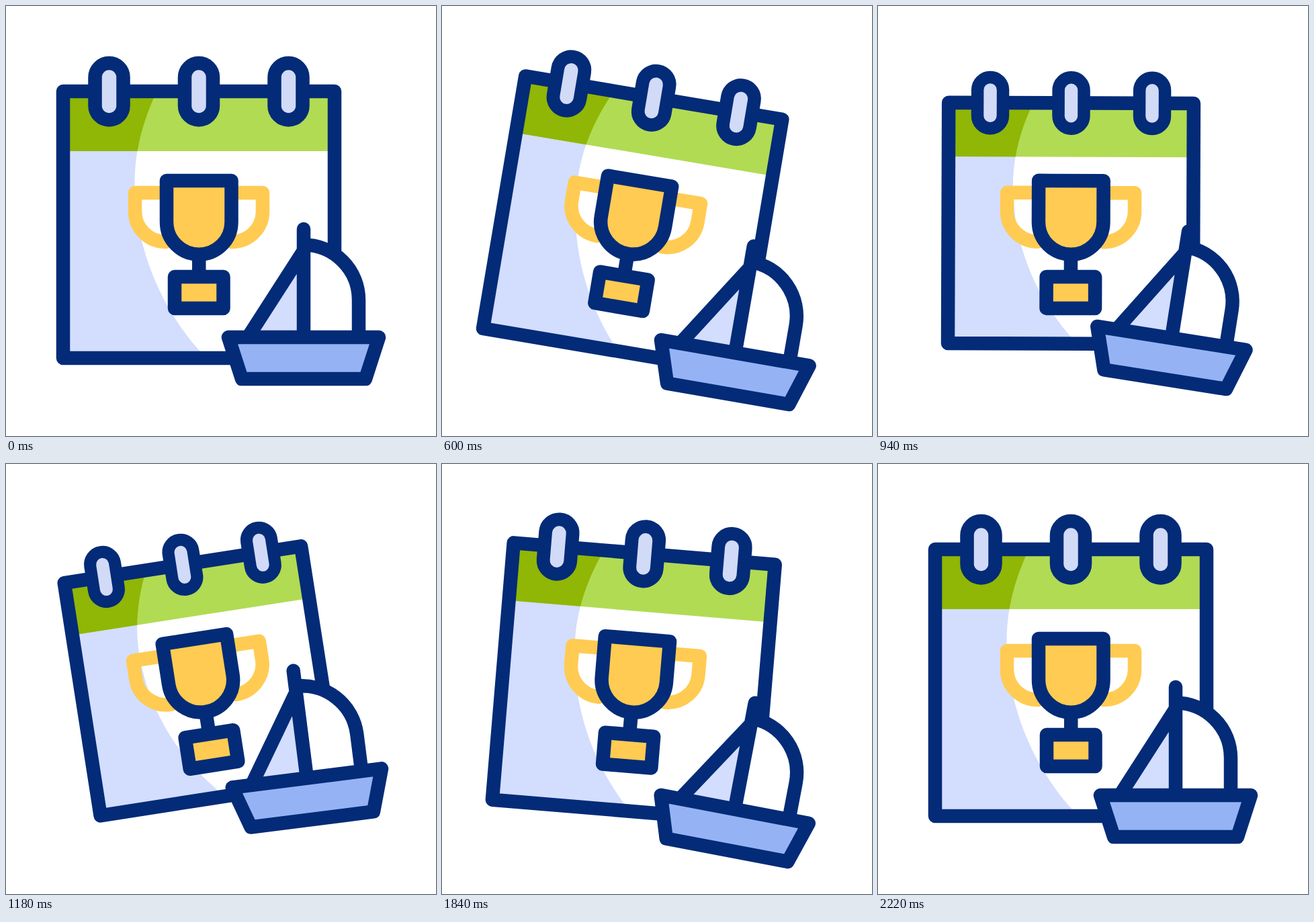
Recreate the animation shown at these times as an HTML page. Size 640x640 px, loop 2.4 s.

```html
<!DOCTYPE html>
<html lang="en">
<head>
<meta charset="utf-8">
<title>Regatta calendar</title>
<style>
  html, body { margin: 0; width: 100%; height: 100%; overflow: hidden; background: #fff; }
  svg { display: block; width: 100vw; height: 100vh; }

  .line {
    fill: none; stroke: #032b77; stroke-width: 20.5;
    stroke-linecap: round; stroke-linejoin: round;
    vector-effect: non-scaling-stroke;
  }
  .gold { fill: #ffcb52; }
  .handle { stroke: #ffcb52; }
  .pale { fill: #d3ddfe; }
  .ring { fill: #d1daf7; }
  .hull { fill: #95b3f4; }
  .white { fill: #fff; }

  .swing, .shrink, .boat {
    animation: 2400ms cubic-bezier(.3333, 0, .6667, 1) infinite;
  }
  .swing, .shrink { transform-origin: 287px 304.5px; }
  .swing { animation-name: swing; }
  .shrink { animation-name: shrink; }
  .boat { transform-origin: 443px 454px; animation-name: rock, bob; }

  @keyframes swing {
    0%, 8.33% { rotate: 0deg; }
    27.5% { rotate: 10deg; }
    50.42% { rotate: -9deg; }
    73.33% { rotate: 5.2deg; }
    92.2%, 100% { rotate: 0deg; }
  }
  @keyframes shrink {
    0%, 8.5% { scale: 1; }
    50.2% { scale: .8825; }
    91.2%, 100% { scale: 1; }
  }
  @keyframes rock {
    0%, 8.33% { rotate: 0deg; }
    31.25%, 34.7% { rotate: 12deg; }
    55.04%, 59.8% { rotate: -12deg; }
    79.4% { rotate: 12deg; }
    92.3%, 100% { rotate: 0deg; }
  }
  @keyframes bob {
    0%, 8.33% { translate: 0 0; }
    29.17% { translate: 0 26.5px; }
    50% { translate: 0 -25.5px; }
    70.83% { translate: 0 26.5px; }
    92%, 100% { translate: 0 0; }
  }
</style>
</head>
<body>
<svg viewBox="0 0 640 640">
  <defs>
    <path id="shade" d="M85 127H224.500C203 172 191.500 218 191.500 262C191.500 358 230 453 298 524H85Z"/>
    <clipPath id="band"><path d="M85 127H489V216H85Z"/></clipPath>
    <rect id="loop" x="-21" y="85" width="42" height="84.500" rx="21"/>
  </defs>

  <g class="swing">
    <g class="shrink">
      <path class="white" d="M85 127H489V524H85Z"/>
      <use href="#shade" class="pale"/>
      <path fill="#b1db53" d="M85 127H489V216H85Z"/>
      <g clip-path="url(#band)"><use href="#shade" fill="#90b606"/></g>
      <path class="line" d="M85 127H489V524H85Z"/>
      <use href="#loop" x="153.500" class="line ring"/>
      <use href="#loop" x="287" class="line ring"/>
      <use href="#loop" x="420.500" class="line ring"/>
    </g>

    <!-- trophy -->
    <path class="line handle" d="M239 278H192V306A46 45 0 0 0 238 351M335 278H382V306A46 45 0 0 1 336 351"/>
    <path class="line" stroke-linecap="butt" d="M287.250 370V403"/>
    <path class="line gold" d="M239 260H335.500V321.500A48.250 48.250 0 0 1 239 321.500Z"/>
    <path class="line gold" d="M251 403H323.500V450H251Z"/>
  </g>

  <g class="boat">
    <path class="white" d="M443 355.500A82 82 0 0 1 525 437.500V493H443Z"/>
    <path class="pale" d="M443 364L360 493H443Z"/>
    <path class="line" d="M443 355.500A82 82 0 0 1 525 437.500V493M443 364L360 493M443 332V493"/>
    <path class="line hull" d="M331 493H555L535 555H351Z"/>
  </g>
</svg>
</body>
</html>
```
